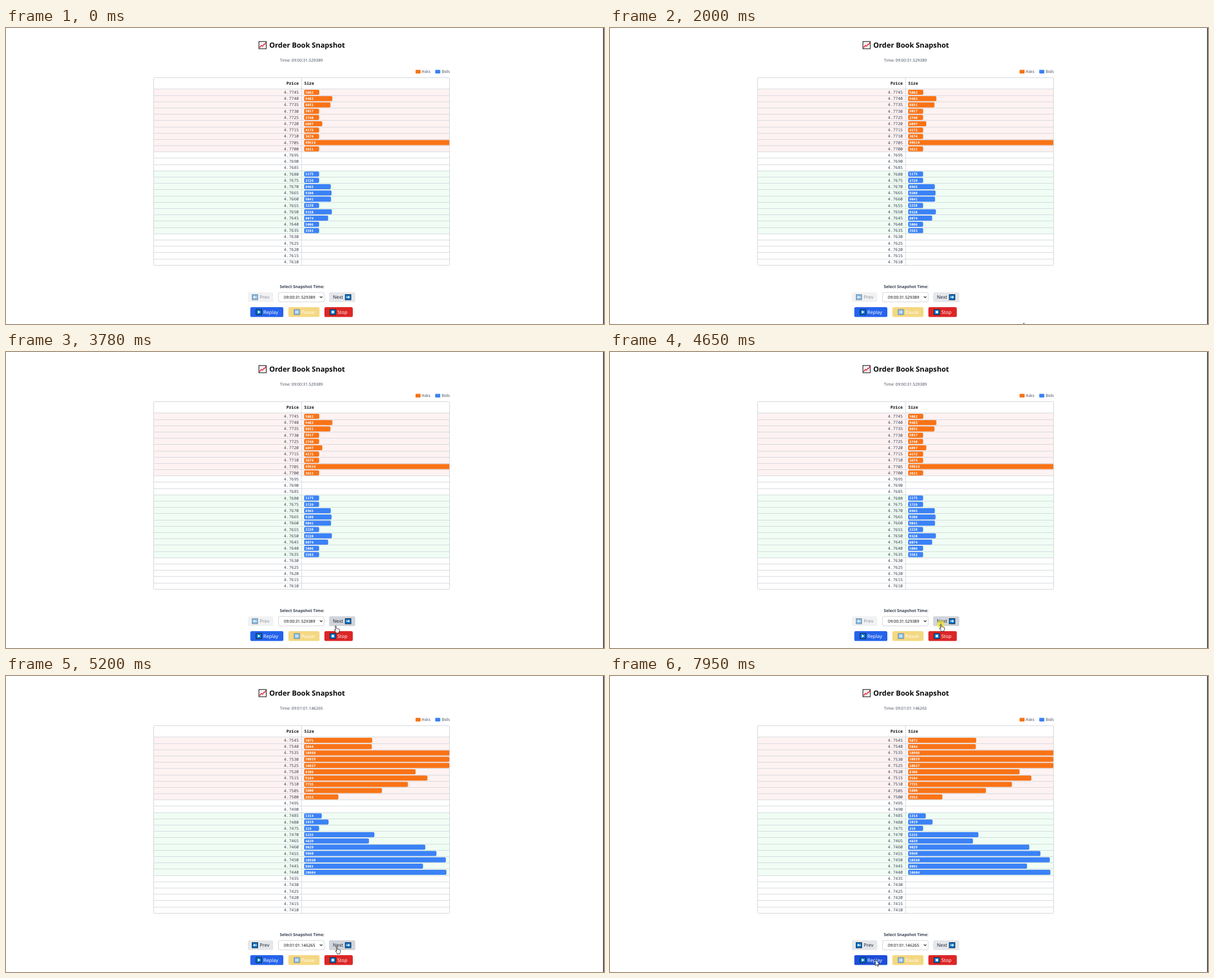
Recreate the animation shown at these times as an HTML page. Size 1063 px wide and 527 px high, loop 8000 ms.

```html
<!DOCTYPE html>
<html lang="en">
<head>
<meta charset="utf-8">
<title>Order Book Snapshot</title>
<style>
  html, body { margin: 0; width: 100%; height: 100%; overflow: hidden; background: #fff; }
  svg { display: block; width: 1063px; height: 527px; }
  text { font-family: "Noto Sans", "Open Sans", sans-serif; font-size: 7.25px; fill: #4b5563;
         text-rendering: geometricPrecision; white-space: pre; }
  .mono { font-family: "Noto Sans Mono", "DejaVu Sans Mono", monospace; font-size: 7.33px; fill: #374151; }
  .head { font-weight: 700; fill: #111; }
  .size { font-size: 6.15px; font-weight: 700; fill: #fff; }
  .title { font-size: 12.7px; font-weight: 700; fill: #0a0a0a; }
  .label { font-weight: 600; fill: #374151; }
  .btn { font-size: 8.4px; }
  .end { text-anchor: end; }
</style>
</head>
<body>
<svg id="stage" viewBox="0 0 1063 527"></svg>
<script>
const LOOP = 8000;
const NS = "http://www.w3.org/2000/svg";
const stage = document.getElementById("stage");

function add(parent, tag, attrs, text) {
  const el = document.createElementNS(NS, tag);
  for (const key in attrs) el.setAttribute(key, attrs[key]);
  if (text !== undefined) el.textContent = text;
  parent.append(el);
  return el;
}
const rect = (p, x, y, width, height, fill, rx = 0) => add(p, "rect", { x, y, width, height, fill, rx });
const label = (p, x, y, text, cls = "") => add(p, "text", { x, y, class: cls }, text);
const path = (p, d, attrs) => add(p, "path", { d, ...attrs });

// Order book
const ORANGE = "#f97316", BLUE = "#3b82f6", LINE = "#d1d5db";
const ROWS = 28, TOP = 108.9, PITCH = 11.19;
const rowY = i => TOP + i * PITCH;

const snapshots = [
  { from: 0, time: "09:00:31.529389", price: 4.7745, bidRow: 13,
    asks: [5082, 9483, 8851, 5017, 3740, 6097, 4172, 3674, 49614, 3611],
    bids: [1175, 3729, 8965, 9208, 9041, 2228, 9328, 8074, 5006, 3583] },
  { from: 4720, time: "09:00:49.066691", price: 4.7605, bidRow: 18,
    asks: [1426, 33636, 3568, 3908, 3510, 3518, 3962, 6546, 2230, 1086],
    bids: [1133, 3714, 6673, 11541, 5243, 5020, 3545, 9198, 8210, 9454] },
  { from: 5200, time: "09:01:01.146265", price: 4.7545, bidRow: 12,
    asks: [5071, 5044, 10998, 10819, 10827, 8308, 9184, 7735, 5800, 2552],
    bids: [1314, 1819, 319, 5235, 4829, 9029, 9860, 10560, 8861, 10604] }
];

function drawSide(g, sizes, firstRow, max, color, tint) {
  const y0 = Math.floor(rowY(firstRow));
  rect(g, 262, y0, 527, Math.floor(rowY(firstRow + sizes.length)) - y0, tint);
  const bars = add(g, "g", { "clip-path": "url(#table)" });
  sizes.forEach((size, i) => {
    const y = rowY(firstRow + i);
    rect(bars, 530, y + 1.2, Math.max(26.6, size / max * 262.3), 9, color, 2);
    label(bars, 532, y + 8, size, "mono size");
  });
}

function drawSnapshot(s) {
  const g = add(stage, "g", {});
  const max = Math.max(...s.asks, ...s.bids);
  drawSide(g, s.asks, 0, max, ORANGE, "#fef2f2");
  drawSide(g, s.bids, s.bidRow, max, BLUE, "#f0fdf4");
  for (let i = 0; i < ROWS; i++) {
    label(g, 520.5, rowY(i) + 8.2, (s.price - i * 0.0005).toFixed(4), "mono end");
  }
  label(g, 487, 60.2, "Time: " + s.time);
  s.group = g;
}

const clip = add(add(stage, "defs", {}), "clipPath", { id: "table" });
rect(clip, 262, 88, 526.5, 335);

rect(stage, 1061.5, 0, 1.5, 527, "#2b2b2b");

// Heading with chart icon
add(stage, "rect", { x: 449.6, y: 24.1, width: 13, height: 12.8, fill: "#fff", stroke: "#1c1c1c", "stroke-width": 1.2 });
path(stage, "M453.8 25V36.4M458.2 25V36.4M450.2 28.4H462M450.2 32.5H462", { stroke: "#cfd3d6", "stroke-width": .6 });
path(stage, "M450.8 35l3.2-4 2 1.6 2.4-3.8 1.3.8 2.2-4", { fill: "none", stroke: "#e81224", "stroke-width": 1.3 });
label(stage, 468, 35, "Order Book Snapshot", "title");

rect(stage, 728, 74.5, 9, 6.6, ORANGE, 1.3);
label(stage, 739, 80.4, "Asks");
rect(stage, 763, 74.5, 9, 6.6, BLUE, 1.3);
label(stage, 774.5, 80.4, "Bids");

snapshots.forEach(drawSnapshot);

// Table grid
let grid = "M525.5 88V422";
for (let i = 0; i < ROWS; i++) grid += `M262 ${Math.floor(rowY(i)) + .5}H789`;
path(stage, grid, { stroke: LINE, "stroke-width": .9 });
add(stage, "rect", { x: 262.5, y: 88.5, width: 526, height: 334, rx: 1, fill: "none", stroke: LINE });
label(stage, 520.5, 100.8, "Price", "mono head end");
label(stage, 530, 100.8, "Size", "mono head");

// Controls
label(stage, 486.8, 462.8, "Select Snapshot Time:", "label");
add(stage, "rect", { x: 484.5, y: 470.9, width: 81, height: 16.8, rx: 2.5, fill: "#fff", stroke: LINE });
const chosen = label(stage, 494, 481.9, "");
chosen.style.fill = "#111";
path(stage, "M557.9 477.8l2.3 2.4 2.3-2.4", { fill: "none", stroke: "#222", "stroke-width": 1.2 });

const glyphs = {
  left: "M2.2 5l3-2.6v1.8h3.6v1.6H5.2v1.8z",
  right: "M8.8 5l-3-2.6v1.8H2.2v1.6h3.6v1.8z",
  play: "M3.8 2.3L8 5 3.8 7.7z",
  pause: "M3.3 2.5h1.5v5H3.3zM6.2 2.5h1.5v5H6.2z",
  stop: "M3.4 2.9h4.2v4.2H3.4z"
};

function button(x, y, w, text, textX, color, glyph, iconX, fill, hover) {
  const g = add(stage, "g", {});
  const face = rect(g, x, y, w, 17.6, fill, 2.7);
  label(g, textX, y + 11.8, text, "btn").style.fill = color;
  const icon = add(g, "g", { transform: `translate(${iconX} ${y + 3.7})` });
  add(icon, "rect", { x: .5, y: .4, width: 10, height: 9.4, fill: "#0078d7", stroke: "#16202b", "stroke-width": 1 });
  path(icon, glyphs[glyph], { fill: "#fff" });
  return {
    hit: (px, py) => px >= x && px <= x + w && py >= y && py <= y + 17.6,
    paint(on, enabled) {
      face.setAttribute("fill", on ? hover : fill);
      g.setAttribute("opacity", enabled ? 1 : .5);
    }
  };
}
const INK = "#1f2937", GRAY = "#e5e7eb";
const prev = button(430, 470.5, 45, "Prev", 451, INK, "left", 437, GRAY, LINE);
const next = button(574.3, 470.5, 46.5, "Next", 581, INK, "right", 602.6, GRAY, LINE);
const replay = button(434.3, 497, 58.7, "Replay", 457.6, "#fff", "play", 444, "#2563eb", "#1d4ed8");
const pause = button(502, 497, 55.3, "Pause", 525, "#fff", "pause", 511.5, "#eab308", "#ca8a04");
const stop = button(566, 497, 50.5, "Stop", 589, "#fff", "stop", 575.5, "#dc2626", "#b91c1c");
const buttons = [prev, next, replay, pause, stop];

// Pointer
const halo = add(stage, "circle", { r: 7, fill: "#f2e81c", opacity: .65 });
const ink = { fill: "#fff", stroke: "#111", "stroke-width": .8, "stroke-linejoin": "round" };
const arrow = path(stage, "M.3.3V11L2.9 8.6 4.5 12.2 6 11.5 4.4 8H7.7z", ink);
const hand = path(stage, "M-1 1.2Q0-.5 1 1.2V5l1-.1q1 0 1.2.7 1.3-.4 1.7.5 1.6-.2 1.7 1V10l-1 1.8v1.5h-5v-1l-3-4.1q.2-1.3 1.4-.6l1 1z", ink);

// start, end, from x, y, to x, y
const moves = [
  [1070, 1200, 1052, 517, 1000, 540],
  [1600, 1800, 1018, 521, 1070, 540],
  [2000, 2740, 735, 525, 620, 511],
  [2820, 3580, 610, 510, 590, 492],
  [3640, 3780, 588, 488, 586, 487],
  [4050, 4380, 586, 487, 588, 484],
  [4920, 5050, 588, 484, 588, 481.5],
  [5460, 5660, 588, 481.5, 588, 499],
  [5660, 5940, 588, 499, 471.5, 505]
];
const presses = [[4580, 4720], [4920, 5200], [7880, 7950]];

function pointerAt(t) {
  const move = moves.filter(m => t >= m[0]).pop();
  if (!move) return [1000, 540];
  const [start, end, x0, y0, x1, y1] = move;
  const steps = Math.round((end - start) / 67);
  const p = Math.min(1, Math.floor((t - start) / (end - start) * steps + .01) / steps);
  const k = 1 - (1 - p) ** 1.5;
  return [x0 + (x1 - x0) * k, y0 + (y1 - y0) * k];
}

const show = (el, on) => el.setAttribute("visibility", on ? "visible" : "hidden");

function render(t) {
  const current = snapshots.filter(s => t >= s.from).pop();
  snapshots.forEach(s => show(s.group, s === current));
  if (chosen.textContent !== current.time) chosen.textContent = current.time;

  const [x, y] = pointerAt(t);
  const enabled = b => b !== pause && (b !== prev || current !== snapshots[0]);
  const over = buttons.find(b => enabled(b) && b.hit(x, y));
  buttons.forEach(b => b.paint(b === over, enabled(b)));

  const pointing = Boolean(over) && t < 7950;
  for (const el of [arrow, hand]) el.setAttribute("transform", `translate(${x} ${y})`);
  show(hand, pointing);
  show(arrow, !pointing);
  halo.setAttribute("cx", x);
  halo.setAttribute("cy", y + .7);
  show(halo, presses.some(([a, b]) => t >= a && t < b));
}

const began = performance.now();
function tick() {
  render((performance.now() - began) % LOOP);
  requestAnimationFrame(tick);
}
tick();
</script>
</body>
</html>
```
